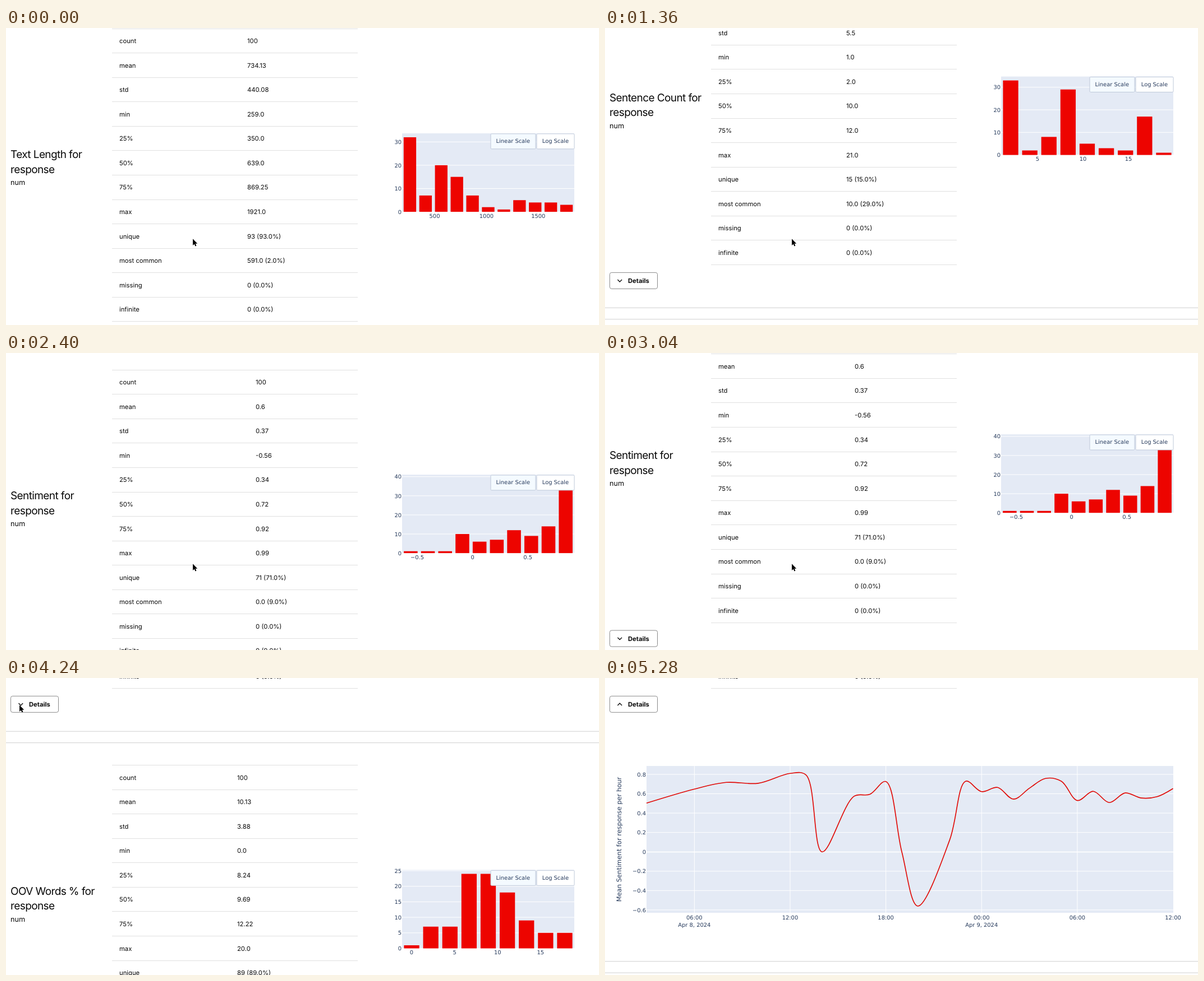
Recreate the animation shown at these times as an HTML page. Size 1057 by 530 pixels, loop 5.36 s.

```html
<!DOCTYPE html>
<html lang="en">
<head>
<meta charset="utf-8">
<title>Text statistics report</title>
<style>
  html, body { margin: 0; width: 100%; height: 100%; overflow: hidden; background: #fff; }
  svg { display: block; width: 1057px; height: 530px; text-rendering: geometricPrecision; }
  .cell, .title, .sub, .btn { font-family: Inter, sans-serif; fill: #080808; }
  .cell { font-size: 11.25px; }
  .title { font-size: 19px; letter-spacing: -.6px; font-weight: 430; }
  .sub { font-size: 12.7px; }
  .btn { font-size: 11.2px; font-weight: 700; }
  .tick { font: 9.9px "DejaVu Sans", sans-serif; fill: #263a5c; }
  .axis { font: 11.5px "DejaVu Sans", sans-serif; fill: #263a5c; }
  .row { shape-rendering: crispEdges; }
</style>
</head>
<body>
<svg id="stage" viewBox="0 0 1057 530"></svg>
<script>
const LOOP = 5360, STEP = 80;
const ROW = 43.58, PITCH = 660, CLICK = 4320;
const RED = '#ed0400', PLOT = '#e4eaf5';
const LABELS = ['count', 'mean', 'std', 'min', '25%', '50%', '75%', 'max',
  'unique', 'most common', 'missing', 'infinite'];

// axis: first label, label step, first x, x step
const SECTIONS = [
  { title: 'Text Length for', x: 430, axis: [500, 500, 764, 92.4],
    stats: ['734.13', '440.08', '259.0', '350.0', '639.0', '869.25', '1921.0',
      '93 (93.0%)', '591.0 (2.0%)'],
    bars: [32, 7, 20, 15, 7, 2, 1, 5, 4, 4, 3] },
  { title: 'Sentence Count for', x: 430, axis: [5, 5, 771, 81],
    stats: ['8.77', '5.5', '1.0', '2.0', '10.0', '12.0', '21.0',
      '15 (15.0%)', '10.0 (29.0%)'],
    bars: [33, 2, 8, 29, 5, 3, 2, 17, 1] },
  { title: 'Sentiment for', x: 445, axis: [-.5, .5, 733, 98.6],
    stats: ['0.6', '0.37', '-0.56', '0.34', '0.72', '0.92', '0.99',
      '71 (71.0%)', '0.0 (9.0%)'],
    bars: [1, 1, 1, 10, 6, 7, 12, 9, 14, 39] },
  { title: 'OOV Words % for', x: 412, axis: [0, 5, 723, 76.6],
    stats: ['10.13', '3.88', '0.0', '8.24', '9.69', '12.22', '20.0',
      '89 (89.0%)', '0.0 (3.0%)'],
    bars: [1, 7, 7, 24, 24, 18, 9, 5, 5] }
];

// Mean sentiment per hour from 03:00; hours without data are left out
const HOURLY = [.503, , , .648, , .717, , .708, , .81, .793, 0, , .573, .594, .726,
  0, -.56, , .122, .729, .622, .665, .544, .657, .758, .729, .53, .625, .509,
  .608, .556, .57, .654];

const stage = document.getElementById('stage');

function add(parent, tag, attrs, text) {
  const node = document.createElementNS('http://www.w3.org/2000/svg', tag);
  for (const k in attrs) node.setAttribute(k, attrs[k]);
  if (text !== undefined) node.textContent = text;
  parent.appendChild(node);
  return node;
}
const group = parent => add(parent, 'g', {});
const rect = (p, x, y, width, height, fill, more) =>
  add(p, 'rect', { x, y, width, height, fill, ...more });
const label = (p, cls, x, y, text, anchor = 'start') =>
  add(p, 'text', { class: cls, x, y, 'text-anchor': anchor }, text);
const move = (node, x, y) => node.setAttribute('transform', `translate(${x} ${y})`);
const signed = v => String(v).replace('-', '−');

function gridLine(p, x, y, width, value, text) {
  rect(p, x, y - .5, width, value ? 1 : 1.6, '#fff');
  label(p, 'tick', x - 1, y + 3.7, text, 'end');
}

function histogram(p, { bars, axis: [first, step, x0, dx] }) {
  const left = 706, width = 307, height = 140, base = 327;
  const range = Math.max(...bars) / .95;
  const unit = height / range, slot = width / bars.length;
  rect(p, left, base - height, width, height, PLOT);
  for (let v = 0; v <= range; v += range < 30 ? 5 : 10)
    gridLine(p, left, base - v * unit, width, v, v);
  bars.forEach((v, i) =>
    rect(p, left + (i + .1) * slot, base - v * unit, slot * .8, v * unit, RED));
  for (let i = 0; x0 + i * dx < left + width; i++)
    label(p, 'tick', x0 + i * dx, 337.7, signed(first + i * step), 'middle');
  const frame = { stroke: '#bec8d9', rx: 1.6 };
  rect(p, 864, 187.8, 80, 27, '#f4faff', frame);
  rect(p, 946, 187.8, 67, 27, '#fff', frame);
  label(p, 'tick', 903.8, 204, 'Linear Scale', 'middle');
  label(p, 'tick', 979.5, 204, 'Log Scale', 'middle');
}

function detailsButton(p) {
  rect(p, 8.5, 536.8, 85, 29, '#fff', { rx: 3.3, stroke: '#8a8a8a' });
  label(p, 'btn', 41, 555.3, 'Details');
  return add(p, 'path', { d: 'M-3.8 -2L0 1.9L3.8 -2', fill: 'none', stroke: '#111',
    'stroke-width': 1.4 });
}

function section(s) {
  const g = group(stage);
  label(g, 'title', 8, 231, s.title);
  label(g, 'title', 8, 257.5, 'response');
  label(g, 'sub', 8, 279, 'num');
  const values = ['100', ...s.stats, '0 (0.0%)', '0 (0.0%)'];
  for (let i = 0; i <= LABELS.length; i++)
    rect(g, 189, i * ROW - .5, 438, 1, '#e0e0e0', { class: 'row' });
  LABELS.forEach((name, i) => {
    label(g, 'cell', 202, i * ROW + 26, name);
    label(g, 'cell', s.x, i * ROW + 26, values[i]);
  });
  histogram(g, s);
  return { g, chevron: detailsButton(g) };
}

function separators(p) {
  for (const y of [599.2, 619.6]) rect(p, 0, y, 1057, 1, '#cfcfcf');
}

// Centripetal Catmull-Rom spline as a path
function spline(pts) {
  const tangents = pts.slice(1, -1).map(([x, y], i) => {
    const ax = pts[i][0] - x, ay = pts[i][1] - y;
    const bx = pts[i + 2][0] - x, by = pts[i + 2][1] - y;
    const a = Math.sqrt(Math.hypot(ax, ay)), b = Math.sqrt(Math.hypot(bx, by));
    const nx = b * b * ax - a * a * bx, ny = b * b * ay - a * a * by;
    const da = 3 * b * (a + b), db = 3 * a * (a + b);
    return [[x + nx / da, y + ny / da], [x - nx / db, y - ny / db]];
  });
  const last = pts.length - 1;
  let d = `M${pts[0]}Q${tangents[0][0]} ${pts[1]}`;
  for (let i = 2; i < last; i++) d += `C${tangents[i - 2][1]} ${tangents[i - 1][0]} ${pts[i]}`;
  return d + `Q${tangents[last - 2][1]} ${pts[last]}`;
}

function timeline() {
  const g = group(stage);
  const px = h => 74 + h * 28.44, py = v => 310.2 - v * 172.8;
  rect(g, 74, 157, 939, 262, PLOT);
  for (let h = 3; h <= 33; h += 6) {
    if (h < 33) rect(g, px(h) - .5, 157, 1, 262, '#fff');
    const clock = String((h + 3) % 24).padStart(2, '0') + ':00';
    label(g, 'tick', px(h), 430.6, clock, 'middle');
  }
  label(g, 'tick', px(3), 443.6, 'Apr 8, 2024', 'middle');
  label(g, 'tick', px(21), 443.6, 'Apr 9, 2024', 'middle');
  for (let i = -3; i <= 4; i++)
    gridLine(g, 74, py(i / 5), 939, i, i ? signed((i / 5).toFixed(1)) : 0);
  const pts = [];
  HOURLY.forEach((v, h) => pts.push([px(h), py(v)]));
  add(g, 'path', { d: spline(pts), fill: 'none', stroke: '#e00a06', 'stroke-width': 1.65 });
  add(g, 'text', { class: 'axis', 'text-anchor': 'middle',
    transform: 'translate(29.3 288) rotate(-90)' }, 'Mean Sentiment for response per hour');
  return g;
}

const upper = SECTIONS.slice(0, 3).map(section);
separators(upper[0].g);
separators(upper[1].g);
const plot = timeline();
const cover = group(stage);
rect(cover, 0, 568, 1057, 800, '#fff');
separators(cover);
const lower = section(SECTIONS[3]);
const pointer = add(stage, 'path', {
  d: 'M0 0V11.6L2.7 9.2L4.4 13.2L6.4 12.3L4.7 8.4H8.2Z',
  fill: '#000', stroke: '#fff', 'stroke-width': .9, 'paint-order': 'stroke' });

// Quick start and soft landing, like a trackpad flick
function flick(t, start, length) {
  const k = Math.min(1, Math.max(0, (t - start) / length));
  return 1 - (1 - k) ** 3 * (1 + 3 * k);
}

function draw(now) {
  const t = Math.floor(now % LOOP / STEP) * STEP;
  const scroll = 816 * flick(t, 700, 912) + 544 * flick(t, 1961, 676)
    + 250 * flick(t, 3024, 360) + 215.5 * flick(t, 3500, 400);
  const open = 410.5 * flick(t, CLICK, 480);
  const reach = flick(t, 3700, 540), leave = flick(t, 4460, 320);
  const top = i => 1 + i * PITCH - scroll;

  upper.forEach((s, i) => move(s.g, 0, top(i)));
  move(cover, 0, top(2) + open);
  move(lower.g, 0, top(3) + open);
  move(plot, 0, top(2) + 504.5);
  plot.setAttribute('visibility', open > 0 ? 'visible' : 'hidden');
  for (const { chevron } of [...upper, lower]) move(chevron, 26.3, 551.5);
  if (t >= CLICK) upper[2].chevron.setAttribute('transform', 'translate(26.3 551.5) scale(1 -1)');
  move(pointer, 333 - 309 * reach + 16 * leave, 376.3 - 328 * reach - 66 * leave);
}

function tick() {
  draw(performance.now());
  requestAnimationFrame(tick);
}
tick();
</script>
</body>
</html>
```
